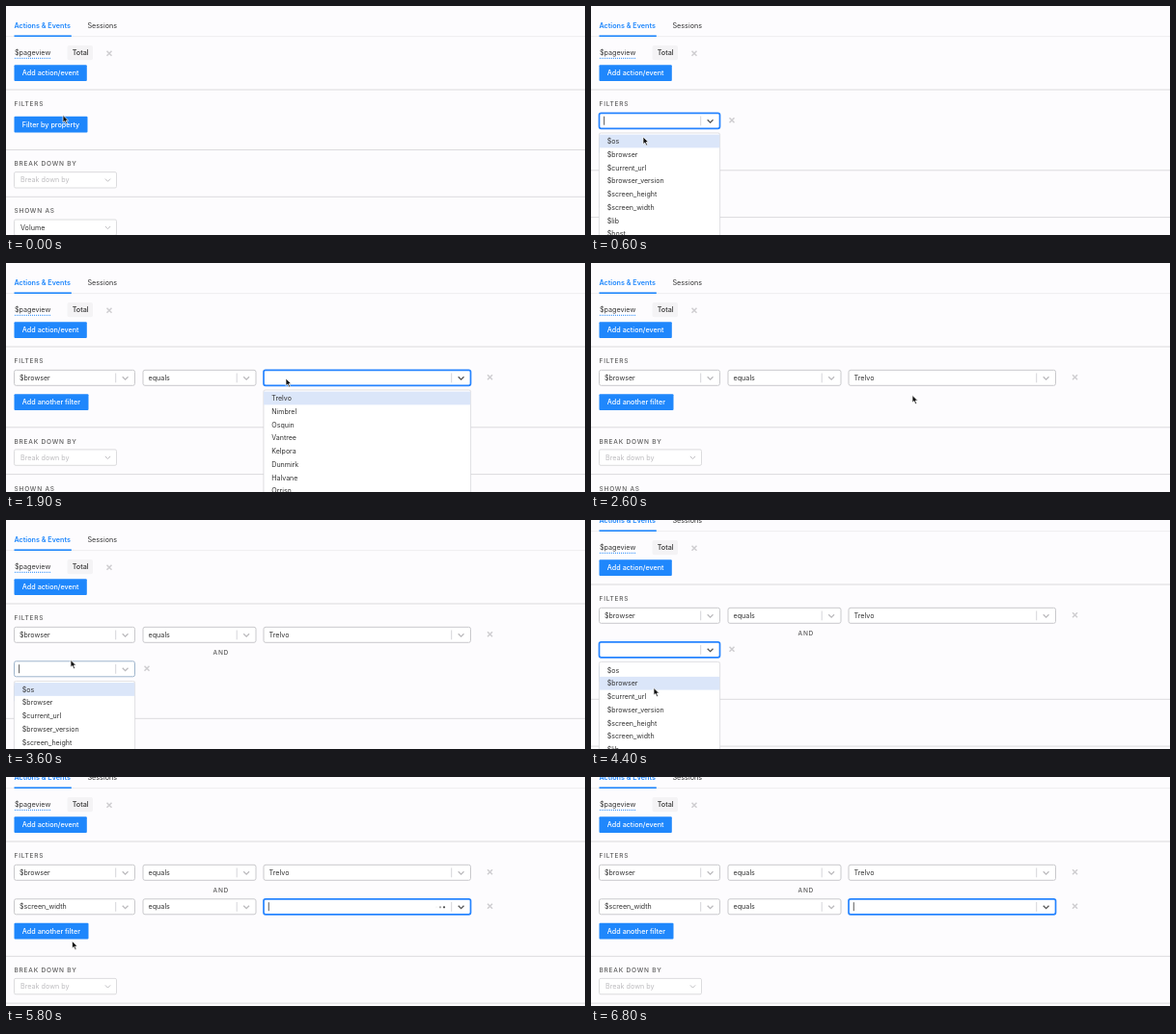
An HTML page for the animation above (6.9 s loop, 600 by 238 pixels).

```html
<!DOCTYPE html>
<html lang="en">
<head>
<meta charset="utf-8">
<title>Property filters</title>
<style>
html, body { margin: 0; width: 100%; height: 100%; overflow: hidden; background: #fdfcfe; }
svg { display: block; width: 600px; height: 238px; font: 7.2px Inter, Roboto, sans-serif; fill: #333; }
.head { font-size: 6.5px; font-weight: 500; letter-spacing: .8px; fill: #5c5c5c; }
.bold { font-weight: 600; }
.mid { font-weight: 500; }
.key { font-size: 7.05px; }
</style>
</head>
<body>
<svg id="stage" viewBox="0 0 600 238"></svg>
<script>
const LOOP = 6900, STEP = 100, ITEM = 13.75, ROW = 35.5;
const BLUE = '#1f87fc', FOCUS = '#2684ff', LINE = '#c9c9cc', PAGE = '#fdfcfe';
const KEYS = ['$os', '$browser', '$current_url', '$browser_version', '$screen_height', '$screen_width',
  '$lib', '$host', '$pathname', '$lib_version', '$device_id', '$insert_id', '$time'];
const VALUES = ['Trelvo', 'Nimbrel', 'Osquin', 'Vantree', 'Kelpora', 'Dunmirk', 'Halvane', 'Orriso'];

// Moments of the interaction, in ms
const T = { open1: 400, pick1: 1000, loaded1: 1600, list: 1900, chosen: 2500,
  open2: 3500, pick2: 5600, loaded2: 6400, hide: 6500 };

// [time, x, y]
const POINTER = [
  [0, 59, 113.5], [100, 61, 116.5], [400, 61, 116.5], [600, 54, 136], [900, 41, 155],
  [1100, 40.5, 156], [1600, 40.5, 156], [1800, 215, 130], [1900, 290, 120], [2000, 290, 120],
  [2400, 331, 137], [2600, 333, 137.5], [2700, 333, 137.5], [3300, 68, 145.5], [3600, 67, 145.5],
  [4100, 65, 172], [4300, 65, 174.5], [5400, 65, 174.5], [5800, 68.5, 170.5], [6000, 68.5, 170.5],
  [6200, 310, 134], [6400, 390, 90]
];
const SCROLL = [[3900, 0], [4000, 5], [4100, 13], [4200, 19], [4300, 20]];
const LIST_SCROLL = [[4800, 0], [5000, 12], [5200, 44], [5400, 4 * ITEM]];

function at(track, t, i = 1) {
  const n = track.findIndex(k => k[0] > t);
  if (n === 0) return track[0][i];
  if (n < 0) return track[track.length - 1][i];
  const a = track[n - 1], b = track[n];
  return a[i] + (b[i] - a[i]) * (t - a[0]) / (b[0] - a[0]);
}

const text = (x, y, s, cls = '', fill = '') =>
  `<text x="${x}" y="${y}" class="${cls}"${fill && ` fill="${fill}"`}>${s}</text>`;
const rect = (x, y, w, h, fill, extra = '') =>
  `<rect x="${x}" y="${y}" width="${w}" height="${h}" fill="${fill}" ${extra}/>`;
const path = (d, stroke, w = 1) =>
  `<path d="${d}" fill="none" stroke="${stroke}" stroke-width="${w}"/>`;
const move = (y, s) => `<g transform="translate(0 ${y})">${s}</g>`;
const rule = y => rect(0, y, 600, 1, '#dcdbde');
const cross = (x, y) => path(`M${x - 2.5} ${y - 2.5}l5 5m0-5l-5 5`, '#cfced1', 1.5);
const button = (y, w, s, down) =>
  rect(8.5, y, w, 16.7, down ? '#1878e4' : BLUE, 'rx="1"') + text(16.8, y + 11, s, 'mid', '#fff');
const blink = (t, since) => (t - since) % 1000 < 500;

// Searchable select in a filter row
function select(x, w, { label = '', focus, soft, caret }) {
  const r = x + w;
  return rect(x, 111.3, w, 16, '#fff',
      `rx="2" stroke="${focus ? FOCUS : soft ? '#9fb5cc' : LINE}" stroke-width="${focus ? 1.7 : 1}"`) +
    path(`M${r - 19.8} 114.5v9.8`, '#d2d2d5', .9) +
    path(`M${r - 12.8} 118.2l2.9 2.9l2.9-2.9`, focus ? '#555' : '#bbbabd', 1.3) +
    (label && text(x + 5.5, 121.9, label, label[0] === '$' ? 'key' : '')) +
    (caret ? rect(x + 4.8, 114.7, .8, 9, '#333') : '');
}

function dots(t, since) {
  return [0, 1, 2].map(i => {
    const p = ((t - since + 590 - 160 * i + 1000) % 1000) / 1000;
    const o = Math.max(0, 1 - Math.abs(p - .4) / .4);
    return `<circle cx="${446 + 4 * i}" cy="119.8" r="1.1" fill="#222" opacity="${o.toFixed(2)}"/>`;
  }).join('');
}

function menu(x, w, items, active, shift = 0) {
  const rows = items.map((s, i) => {
    const y = 133.6 + i * ITEM - shift;
    return (i === active ? rect(x, y, w, ITEM, '#dbe6f9') : '') + text(x + 8.3, y + 9.5, s, 'key');
  }).join('');
  return rect(x - .8, 131.6, w + 1.6, 117, '#000', 'rx="2" opacity=".05"') +
    rect(x, 132, w, 116, '#fff', 'rx="2" stroke="#dedde1" stroke-width=".8"') +
    `<clipPath id="m${x}"><rect x="${x}" y="132.5" width="${w}" height="115"/></clipPath>` +
    `<g clip-path="url(#m${x})">${rows}</g>`;
}

// Row while its key is still being chosen
function keyRow(t, since) {
  const e = t - since;
  return select(8.5, 125, { focus: e >= 200, soft: e >= 100, caret: blink(t, since) }) + cross(146, 118.8);
}

function fullRow(t, key, since, loaded, value) {
  return select(8.5, 125, { label: key }) + select(142, 117, { label: 'equals' }) +
    select(267, 214.5, { label: value, focus: !value, caret: !value && blink(t, since) }) +
    (!value && t < loaded ? dots(t, since) : '') + cross(501.5, 118.8);
}

function plainSelect(y, s, fill) {
  return rect(8.5, y, 106, 16.4, '#fff', 'rx="1.5" stroke="#d9d8db" stroke-width=".9"') +
    text(15, y + 10.8, s, '', fill) + path(`M102.9 ${y + 7}l2.6 2.7l2.6-2.7`, '#b9b8bb', .9);
}

function header() {
  return text(8.5, 22.8, 'Actions &amp; Events', 'bold', BLUE) + text(84.5, 22.8, 'Sessions') +
    rect(0, 31.3, 600, .8, '#ebeaed') + rect(8.5, 30.4, 59.3, 1.6, BLUE) +
    text(9, 50.6, '$pageview') +
    `<path d="M9 54.3H47" stroke="${BLUE}" stroke-dasharray="1 1"/>` +
    rect(63.5, 41, 26.5, 15.3, '#f4f3f5', 'rx="2"') + text(68.7, 51.4, 'Total', 'mid') +
    cross(107, 49.3) + button(61.2, 75.3, 'Add action/event') +
    rule(86.5) + text(8.5, 104, 'FILTERS', 'head');
}

function footer() {
  return rule(149) + text(8.5, 166.3, 'BREAK DOWN BY', 'head') + plainSelect(172.6, 'Break down by', '#bdbcbf') +
    rule(197.8) + text(8.5, 215.3, 'SHOWN AS', 'head') + plainSelect(222, 'Volume', '#333');
}

function filters(t) {
  if (t < T.open1) return button(114.8, 76, 'Filter by property', t >= 300);
  const two = t >= T.open2;
  let s = button(136.3 + (two ? ROW : 0), 77, 'Add another filter', t === 3400);
  s += t < T.pick1 ? keyRow(t, T.open1)
    : fullRow(t, '$browser', T.pick1, T.loaded1, t < T.chosen ? '' : VALUES[0]);
  if (two) {
    s += text(214.5, 139.8, 'AND', 'head', '#777') +
      move(ROW, t < T.pick2 ? keyRow(t, T.open2) : fullRow(t, '$screen_width', T.pick2, T.loaded2, ''));
  }
  return s;
}

function menus(t) {
  if (t >= T.open1 && t < T.pick1) return menu(8.5, 125, KEYS, t < 800 ? 0 : 1);
  if (t >= T.list && t < T.chosen) return menu(267, 214.5, VALUES, 0);
  if (t >= T.open2 && t < T.pick2) {
    const shift = at(LIST_SCROLL, t);
    return move(ROW, menu(8.5, 125, KEYS, t < 4100 ? 0 : Math.round(1 + shift / ITEM), shift));
  }
  return '';
}

function pointer(t) {
  if (t >= T.hide) return '';
  return `<path transform="translate(${at(POINTER, t)} ${at(POINTER, t, 2)})"
    d="M0 0V7.6L1.8 6L3.1 9L4.5 8.4L3.2 5.5H5.6Z" fill="#111" stroke="#fff" stroke-width=".7"/>`;
}

function scene(t) {
  const drop = t < T.open1 ? 0 : t < T.open2 ? 21.3 : 21.3 + ROW;
  const page = header() + move(drop, footer()) + filters(t) + menus(t);
  return rect(0, 0, 600, 238, PAGE) + move(-at(SCROLL, t), page) + pointer(t);
}

const stage = document.getElementById('stage');
const start = performance.now();
let shown = -1;

function tick() {
  const t = Math.floor((performance.now() - start) % LOOP / STEP) * STEP;
  if (t !== shown) stage.innerHTML = scene(shown = t);
  requestAnimationFrame(tick);
}
tick();
</script>
</body>
</html>
```
